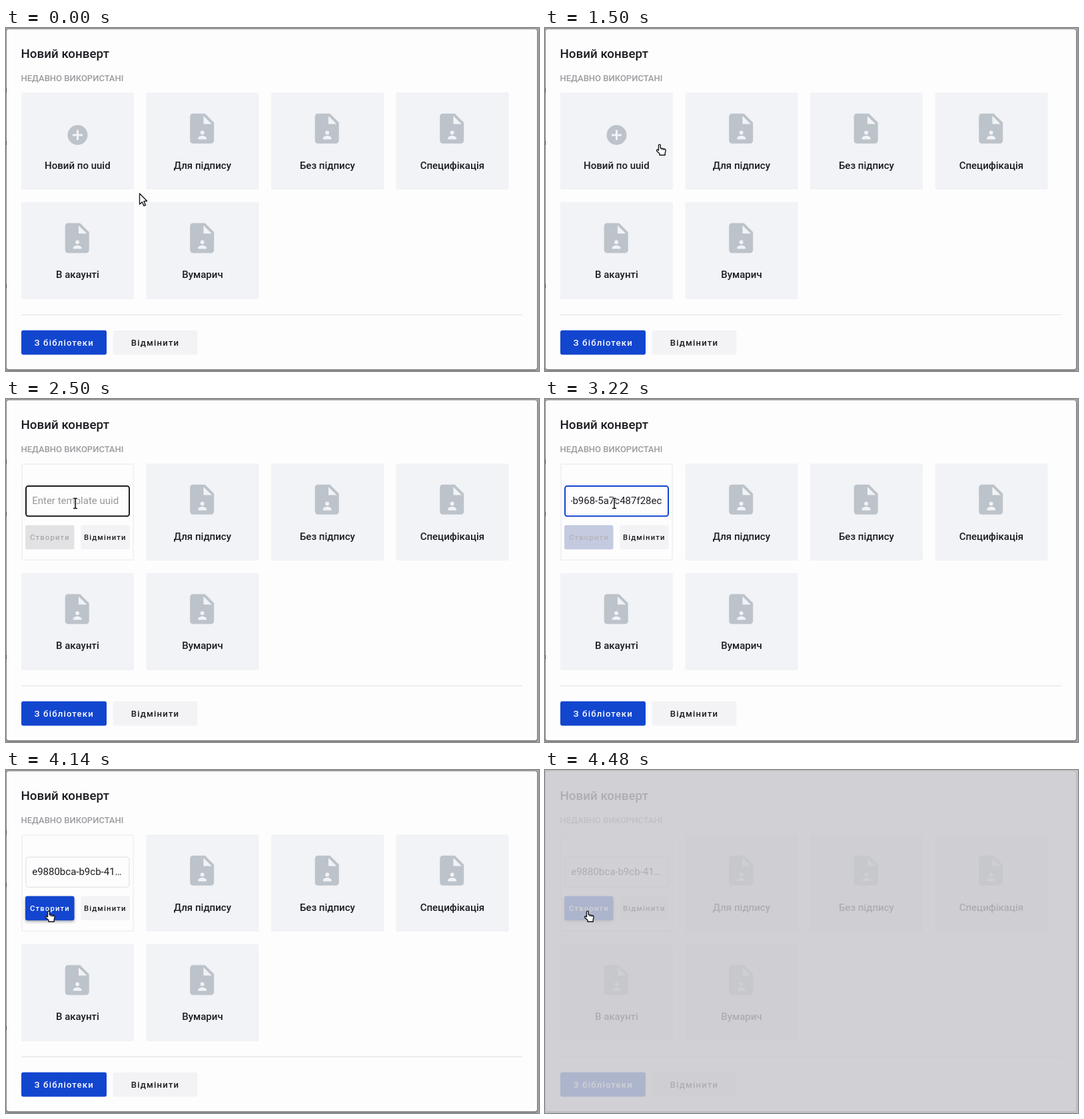
Write an HTML page that moves like this. It is 800 by 516 pixels and loops after 4500 ms.

```html
<!DOCTYPE html>
<html lang="uk">
<head>
<meta charset="utf-8">
<title>Новий конверт</title>
<style>
  html, body { margin: 0; width: 100%; height: 100%; overflow: hidden; background: #c9c9cd; }
  svg { display: block; }
  text { font-family: Roboto, "Noto Sans", sans-serif; font-weight: 500; fill: #1b1c21; }
  .title { font-size: 18.75px; }
  .section { font-size: 13px; fill: #9b9b9f; }
  .label { font-size: 15px; text-anchor: middle; }
  .button { font-size: 13.125px; letter-spacing: 1.17px; }
  .small { font-size: 11.25px; letter-spacing: 1.17px; }
  .value { font-size: 15px; font-weight: 400; }
  .hint { fill: #97979b; }
  .light { fill: #fff; }
  .card { fill: #f1f3f6; }
  .icon { fill: #bdc3ca; }
  .primary { fill: #1346cf; }
  .plain { fill: #f3f2f5; }
  .dialog { fill: #fefdfe; filter: drop-shadow(0 1px 1.5px #0008); }
  .pressed { filter: drop-shadow(0 2px 2px #0005); }
  #cursor path { fill: #fff; stroke: #15151a; stroke-width: 1.4; stroke-linejoin: round; }
</style>
</head>
<body>
<svg width="800" height="516" viewBox="0 0 800 516">
  <defs>
    <clipPath id="inner"><rect x="39" y="140" width="136.5" height="28"/></clipPath>
    <g id="doc">
      <path class="icon" d="M6 2C4.900 2 4 2.900 4 4V20C4 21.100 4.900 22 6 22H18C19.100 22 20 21.100 20 20V8L14 2zM13 9V3.500L18.500 9z"/>
      <circle class="card" cx="12.200" cy="14.700" r="1.300"/>
      <path class="card" d="M9.400 19.200V18.400C9.400 17.400 11.200 16.800 12.200 16.800S15 17.400 15 18.400V19.200z"/>
    </g>
  </defs>

  <g id="ui">
    <rect width="800" height="516" fill="#a5a5a8"/>
    <path d="M.5 91v6M.5 170v6M.5 385v6" stroke="#555"/>
    <rect class="dialog" x="1" y="2" width="796" height="511.500" rx="3.500"/>
    <text class="title" x="22.500" y="45">Новий конверт</text>
    <text class="section" x="22.500" y="79.500">НЕДАВНО ВИКОРИСТАНІ</text>

    <g id="cards"></g>

    <g id="create">
      <rect class="card" x="23" y="97" width="169" height="146.200" rx="2"/>
      <path class="icon" transform="translate(89.500 143) scale(1.500)"
        d="M12 2a10 10 0 1 0 0 20a10 10 0 1 0 0-20zM17 13H13V17H11V13H7V11H11V7H13V11H17z"/>
      <text class="label" x="107.400" y="211.500">Новий по uuid</text>
    </g>

    <g id="form">
      <rect x="24" y="98" width="167" height="144.200" rx="1.500" fill="#fefdfe" stroke="#f2f2f5" stroke-width="2"/>
      <rect id="field" x="30" y="131" width="155" height="45.200" rx="3.500" fill="none"/>
      <text id="hint" class="value hint" x="39.200" y="158.300">Enter template uuid</text>
      <rect id="caret" x="40" y="145" width="1.200" height="17" fill="#1346cf"/>
      <g clip-path="url(#inner)">
        <text id="tail" class="value" x="175.300" y="158.300" text-anchor="end">e9880bca-b9cb-41d2-b968-5a7c487f28ec</text>
      </g>
      <text id="head" class="value" x="39.200" y="158.300">e9880bca-b9cb-41…</text>

      <rect x="29" y="189.700" width="73.500" height="36.500" rx="3" fill="#e2e1e4"/>
      <text class="small" x="36" y="211.600" style="fill:#aaa8ad">Створити</text>
      <g id="ready">
        <rect id="submit" class="primary" x="29" y="189.700" width="73.500" height="36.500" rx="3"/>
        <text class="small light" x="36" y="211.600">Створити</text>
      </g>
      <rect class="plain" x="112.300" y="189.700" width="73.500" height="36.500" rx="3"/>
      <text class="small" x="117" y="211.600">Відмінити</text>
    </g>

    <path d="M23 431.500H774.500" stroke="#dfdfe2"/>
    <rect class="primary" x="23" y="454.800" width="128" height="36.600" rx="3"/>
    <text class="button light" x="42.600" y="477.700">З бібліотеки</text>
    <rect class="plain" x="160.500" y="454.800" width="127" height="36.600" rx="3"/>
    <text class="button" x="187.800" y="477.700">Відмінити</text>
  </g>

  <g id="cursor">
    <g id="arrow"><path d="M.500 0V16.200L4.300 12.800L7 18.600L9.500 17.400L6.900 11.800L11.600 11.300z"/></g>
    <g id="hand">
      <path d="M-1.500 9V1.500A1.400 1.400 0 0 1 1.300 1.500V5.800L7.300 7Q9.300 7.500 9.100 9.400L8.200 13.500V16.200H0V14L-4.300 9.900Q-4.600 7.600-2.900 7.900z"/>
      <path d="M3.600 6.500V8.600M6.200 7V9" style="stroke-width:1"/>
    </g>
    <g id="beam">
      <path d="M-3.500-7.500H3.500M0-7.500V7.500M-3.500 7.500H3.500" style="stroke:#fff;stroke-width:3.500"/>
      <path d="M-3-7.500H3M0-7.500V7.500M-3 7.500H3" style="stroke-width:1.600"/>
    </g>
  </g>
</svg>

<script>
const LOOP = 4500, STEP = 20;
const OPEN = 2140, FOCUS = 2580, PASTE = 3220, PRESS = 4120;
const $ = id => document.getElementById(id);
const show = (id, on) => $(id).setAttribute('visibility', on ? 'inherit' : 'hidden');
const clamp = v => Math.max(0, Math.min(1, v));

const CARDS = [
  [1, 0, 'Для підпису'], [2, 0, 'Без підпису'], [3, 0, 'Специфікація'],
  [0, 1, 'В акаунті'], [1, 1, 'Вумарич']
];
const cardX = col => 23 + col * 187.5;
const cardY = row => 97 + row * 164.8;

$('cards').innerHTML = CARDS.map(([col, row, name]) => `
  <g transform="translate(${cardX(col)} ${cardY(row)})">
    <rect class="card" width="169" height="146.2" rx="2"/>
    <use href="#doc" transform="translate(56.7 27.3) scale(2.25)"/>
    <text class="label" x="84.4" y="114.5">${name}</text>
  </g>`).join('');

// Pointer hotspot: time, x, y
const PATH = [
  [0, 200, 249], [80, 70, 330], [160, 110, 445], [250, 390, 462], [340, 630, 320],
  [410, 620, 130], [470, 420, 52], [540, 190, 97], [680, 100, 92], [820, 36, 111],
  [920, 8, 240], [1000, 10, 380], [1080, 52, 452], [1180, 115, 458], [1300, 170, 380],
  [1400, 180, 270], [1500, 172, 175], [1680, 172, 175], [1920, 108, 162],
  [2140, 108, 162], [2480, 104, 157], [3560, 104, 157], [3700, 88, 184],
  [4080, 64, 212], [4500, 64, 212]
];

function slope(i, k) {
  const a = PATH[i - 1], p = PATH[i], b = PATH[i + 1];
  if (!a || !b) return 0;
  const still = q => q[1] === p[1] && q[2] === p[2];
  return still(a) || still(b) ? 0 : (b[k] - a[k]) / (b[0] - a[0]);
}

function pointer(t) {
  let i = 0;
  while (PATH[i + 1][0] <= t) i++;
  const a = PATH[i], b = PATH[i + 1], d = b[0] - a[0];
  const u = (t - a[0]) / d, v = 1 - u;
  return [1, 2].map(k =>
    a[k] * v * v * (1 + 2 * u) + b[k] * u * u * (3 - 2 * u) +
    d * u * v * (slope(i, k) * v - slope(i + 1, k) * u));
}

function cursorKind(x, y, open) {
  const inside = (l, t, w, h) => x >= l && x <= l + w && y >= t && y <= t + h;
  if (open && inside(29, 130, 157, 47)) return 'beam';
  const targets = CARDS.map(([c, r]) => [cardX(c), cardY(r), 169, 146.2]);
  targets.push([23, 449, 128, 48], [160, 449, 127, 48]);
  if (open) targets.push([29, 183.5, 73, 48], [112, 183.5, 73, 48]);
  else targets.push([23, 97, 169, 146.2]);
  return targets.some(r => inside(...r)) ? 'hand' : 'arrow';
}

function fade(t) {
  if (t < 4460) return 1 - 0.2 * clamp((t - 4420) / 40);
  return 0.8 - 0.65 * clamp((t - 4460) / 20);
}

function render(t) {
  const open = t >= OPEN, pressed = t >= PRESS;
  const [x, y] = pointer(t);
  const kind = cursorKind(x, y, open);
  $('cursor').setAttribute('transform', `translate(${x} ${y})`);
  for (const id of ['arrow', 'hand', 'beam']) show(id, id === kind);

  show('create', !open);
  show('form', open);
  show('hint', t < PASTE);
  show('tail', t >= PASTE && !pressed);
  show('head', pressed);
  show('caret', t >= FOCUS && t < PASTE && !(t >= 2680 && t < 2880));

  const field = $('field');
  field.setAttribute('stroke', pressed ? '#dcdbde' : t >= FOCUS ? '#1346cf' : '#1b1c21');
  field.setAttribute('stroke-width', pressed ? 1 : 2);
  $('ready').setAttribute('opacity', clamp((t - PASTE + STEP) / 140));
  $('submit').classList.toggle('pressed', pressed);
  $('ui').setAttribute('opacity', fade(t));
}

const start = performance.now();
function tick() {
  const t = (performance.now() - start) % LOOP;
  render(Math.floor(t / STEP) * STEP);
  requestAnimationFrame(tick);
}
tick();
</script>
</body>
</html>
```
